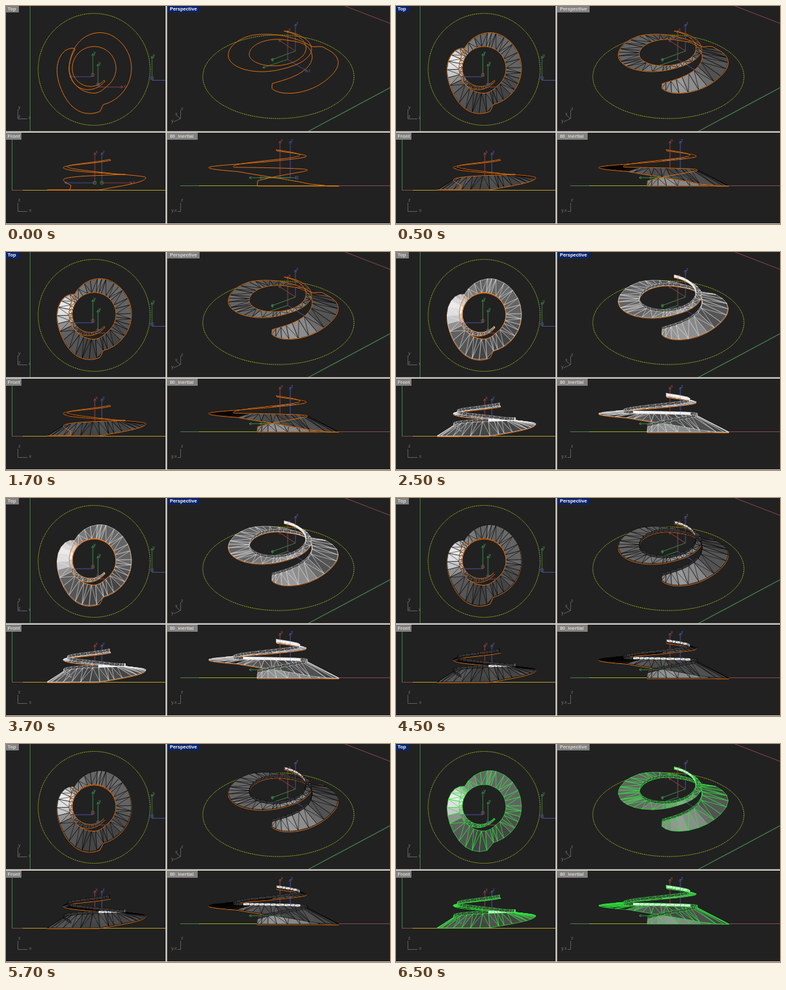
Write an HTML page that moves like this. It is 597 px wide and 339 px high and loops after 8000 ms.

```html
<!DOCTYPE html>
<html lang="en">
<head>
<meta charset="utf-8">
<title>Spiral ramp in four views</title>
<style>
html, body { margin: 0; width: 100%; height: 100%; overflow: hidden; background: #212121; }
svg { display: block; width: 100vw; height: 100vh; }
text { font: 7px "Liberation Sans", Arial, sans-serif; }
.tab { font-size: 7.5px; font-weight: bold; }
.step { visibility: hidden; animation: 8s step-end infinite; }
#wire { animation-name: wire; }
#shaded { animation-name: shaded; }
#picked { animation-name: picked; }
#solid { animation-name: solid; }
#green { animation-name: green; }
@keyframes wire { 0% { visibility: visible } 6.25%, 100% { visibility: hidden } }
@keyframes shaded { 0% { visibility: hidden } 6.25% { visibility: visible } 31.25%, 100% { visibility: hidden } }
@keyframes picked { 0% { visibility: hidden } 31.25% { visibility: visible } 56.25%, 100% { visibility: hidden } }
@keyframes solid { 0% { visibility: hidden } 56.25% { visibility: visible } 81.25%, 100% { visibility: hidden } }
@keyframes green { 0% { visibility: hidden } 81.25%, 100% { visibility: visible } }
</style>
</head>
<body>
<svg id="stage" viewBox="0 0 597 339" preserveAspectRatio="none"></svg>
<script>
const START = 135, END = 670, RAD = Math.PI / 180;
const ORANGE = '#e4700f', RED = '#8f4349', BLUE = '#4d4f98', LEAF = '#3b8a4a', GREY = '#707074';

const ease = (a, b, t) => { t = Math.max(0, Math.min(1, (t - a) / (b - a))); return t * t * (3 - 2 * t); };

// The ramp in space: radius and height of each edge by angle in degrees
function outer(t) {
  const bulge = 13 * Math.exp(-(((t - 258) / 36) ** 2)) * (1 - ease(277, 285, t));
  const r = 58 - 14 * Math.exp((START - t) / 14) + bulge - 19 * ease(420, 530, t) - 13 * ease(570, 680, t);
  return at(r, t, climb(t));
}
function inner(t) {
  const r = 38.5 + 3.5 * Math.exp((START - t) / 14) - 4.5 * ease(270, 310, t) - 11 * ease(540, 700, t);
  return at(r, t, Math.max(climb(t) + 1.5, 25 - 18 * Math.exp((START - t) / 70)));
}
const climb = t => Math.max(0, Math.min((t - 272) * .216, 19 + (t - 360) * .087));
const at = (r, t, h) => [r * Math.cos(t * RAD), -r * Math.sin(t * RAD), h];

const views = [
  { show: ([x, y]) => [137 + x, 97 + y], gain: 140 },
  { show: ([x, y, h]) => [424 + 1.11 * y - .77 * x, 97 - .41 * y - .59 * x - .87 * h],
    gain: 55, wall: 3.5, lit: t => t > 575 },
  { show: ([x, y, h]) => [140.5 + 1.325 * x, 286 - h],
    gain: 50, wall: 4, dark: true, lit: t => t > 270 && t < 365 },
  { show: ([x, y, h]) => [407.5 + 1.365 * y - .82 * x, 280 - 1.19 * h],
    gain: 50, wall: 4, dark: true, lit: t => t > 575 || (t > 270 && t < 365) }
];

const n = v => +v.toFixed(1);
const poly = (...ps) => 'M' + ps.map(([x, y]) => n(x) + ' ' + n(y)).join('L');
const path = (d, stroke, width = 1, fill = 'none', more = '') =>
  `<path d="${d}" stroke="${stroke}" stroke-width="${width}" fill="${fill}" stroke-linejoin="round" ${more}/>`;
const rect = (x, y, w, h, fill) => `<rect x="${x}" y="${y}" width="${w}" height="${h}" fill="${fill}"/>`;
const word = (x, y, s, fill, more = '') => `<text x="${x}" y="${y}" fill="${fill}" ${more}>${s}</text>`;
const grey = g => { g = Math.round(Math.max(0, Math.min(250, g))); return `rgb(${g},${g},${g})`; };

function edges(v, both = true, shift = 0) {
  const show = p => { const [x, y] = v.show(p); return [x, y + shift]; };
  const line = edge => {
    const ps = [];
    for (let t = START; t <= END; t += 2.5) ps.push(show(edge(t)));
    return poly(...ps);
  };
  let d = line(inner);
  if (both) d += line(outer) + [START, END].map(t => poly(show(outer(t)), show(inner(t)))).join('');
  return path(d, ORANGE);
}

function mesh(v, ink, width, walled) {
  let out = '', walls = '', seed = 7, next;
  const rnd = () => (seed = seed * 16807 % 2147483647) / 2147483647;
  for (let t = START; t < END; t = next) {
    next = Math.min(END, t + 6 + 9 * rnd());
    const [a, b, c, d] = [outer(t), inner(t), inner(next), outer(next)].map(v.show);
    const shine = v.gain * Math.max(0, Math.cos((t - 165) * RAD)) ** 6;
    const under = v.dark && t > 355 && t < 510;
    const tone = under ? 18 : 92 + shine + 18 * Math.cos((t - 440) * RAD) + 24 * (rnd() - .5);
    const cross = rnd() < .6 ? poly(a, c) : poly(b, d);
    out += path(poly(a, b, c, d) + 'Z' + cross, ink, width, grey(tone));
    if (walled && v.wall) {
      const up = ([x, y]) => [x, y - v.wall];
      walls += path(poly(b, up(b), up(c), c) + 'Z' + poly(b, up(c)), ink, width * .7, grey(v.lit(t) ? 245 : 60));
    }
  }
  return out + walls;
}

function arrow(x1, y1, x2, y2, color, name = '') {
  const a = Math.atan2(y2 - y1, x2 - x1);
  const tip = k => [x2 - 4 * Math.cos(a + k), y2 - 4 * Math.sin(a + k)];
  return path(poly([x1, y1], [x2, y2]) + poly(tip(.5), [x2, y2], tip(-.5)), color, .9) +
    (name && word(x2 + 1, y2 + 1, name, color));
}
const node = (x, y, c) => path(`M${x - 2} ${y - 2}h4v4h-4z`, c, .9);

const axes =
  arrow(135, 110, 135, 74, LEAF, 'y') + arrow(135, 110, 99, 110, BLUE) + node(135, 107, RED) +
  arrow(143, 124, 143, 90, LEAF, 'y') + arrow(143, 126, 182, 126, RED, 'x') + node(143, 122, BLUE) +
  arrow(450, 70, 450, 28, BLUE, 'z') + arrow(450, 70, 412, 84, LEAF, 'y') + arrow(450, 70, 424, 53, RED) +
  arrow(438, 83, 438, 38, RED, 'x') + arrow(438, 83, 399, 96, LEAF) + arrow(438, 83, 469, 102, BLUE, 'z') +
  arrow(138, 275, 138, 228, RED, 'x') + arrow(138, 275, 91, 275, BLUE) +
  arrow(149, 275, 149, 228, BLUE, 'z') + arrow(149, 275, 196, 275, RED, 'x') +
  node(138, 275, LEAF) + node(149, 275, LEAF) +
  arrow(426, 267, 426, 210, RED, 'x') + arrow(442, 267, 442, 210, BLUE, 'z') +
  arrow(452, 267, 378, 267, LEAF) + arrow(442, 267, 394, 267, LEAF) + node(452, 267, BLUE);

const ring = `fill="none" stroke="#a2c41c" stroke-width=".9" stroke-dasharray="2 1"`;
const scene = rect(0, 0, 597, 339, '#212121') +
  path('M37.5 0V195', '#45804e') +
  `<circle cx="137" cy="98.5" r="87" ${ring}/><ellipse cx="423.5" cy="110" rx="117.5" ry="65" ${ring}/>` +
  arrow(227, 115, 227, 78, LEAF, 'y') + path('M227 115.5H248', BLUE) + node(227, 112, BLUE) +
  path('M527 0L597 27', '#84484e') + path('M470 195L597 127', '#45804e', 1.3) +
  path('M9.5 208V287', '#45804e') + path('M9 286.5H26', '#84484e') + path('M26 286.5H248', '#b99a1d') +
  path('M271 279.5H300', '#45804e') + path('M300 279.5H480', '#8fae1c') +
  path('M480 279.5H515', '#b99a1d') + path('M515 279.5H597', '#84484e') +
  path('M18.5 161V175.5H33M18.5 306V319.5H33M271.5 162V175L261 180M271 175L265 170M271.5 306V319.5H267', GREY, .8) +
  word(19, 160, 'y', GREY) + word(19, 174, 'z', GREY) + word(35, 176, 'x', GREY) +
  word(19, 304, 'z', GREY) + word(36, 320, 'x', GREY) +
  word(272, 162, 'z', GREY) + word(263, 170, 'x', GREY) + word(257, 181, 'y', GREY) +
  word(272, 304, 'z', GREY) + word(257, 320, 'y.x', GREY) +
  `<g id="axes">${axes}</g>`;

const frame = rect(248, 0, 2.5, 339, '#d0cdc6') + rect(0, 194.7, 597, 2.3, '#d0cdc6') + rect(0, 338, 597, 1, '#d0cdc6');

function tab(x, y, w, name, on) {
  return rect(x, y, w, y ? 11 : 10, on ? '#0a246a' : '#808080') +
    word(x + (x ? 4.2 : 2.5), y + (y ? 8.3 : 7.3), name, on ? '#fff' : '#d8d5ce', 'class="tab"');
}
const tabs = active =>
  tab(0, 0, 20, 'Top', active === 'Top') + tab(250.5, 0, 50.5, 'Perspective', active === 'Perspective') +
  tab(0, 197, 24, 'Front') + tab(250.5, 197, 47.5, '80_inertial');

const step = (id, active, draw) =>
  `<g id="${id}" class="step">${views.map(draw).join('')}` +
  `${id === 'wire' ? '' : '<use href="#axes" opacity=".3"/>'}${tabs(active)}</g>`;

const thick = ink => (v, i) => edges(v, true, 1) + mesh(v, ink, .55, true) + (i ? '' : edges(v, false));

document.getElementById('stage').innerHTML = scene +
  step('wire', 'Perspective', v => edges(v)) +
  step('shaded', 'Top', v => mesh(v, '#000', .6, false) + edges(v)) +
  step('picked', 'Perspective', thick('#ececec')) +
  step('solid', 'Perspective', thick('#000')) +
  step('green', 'Top', v => mesh(v, '#2fe63c', .75, true)) +
  frame;
</script>
</body>
</html>
```
